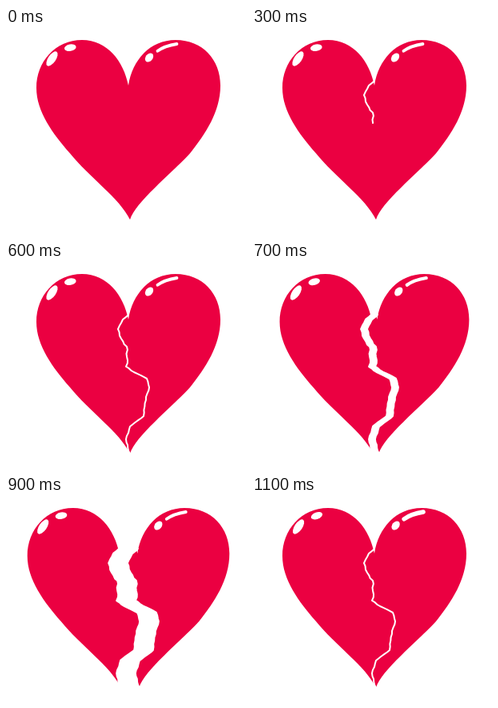
Recreate the animation shown at these times as an HTML page with a canvas. Size 300 by 258 pixels, loop 1200 ms.

```html
<!DOCTYPE html>
<html lang="en">
<head>
<meta charset="utf-8">
<title>Breaking heart</title>
<style>
  html, body { margin: 0; width: 100%; height: 100%; overflow: hidden; background: #fff; }
  canvas { display: block; width: 300px; height: 258px; }
</style>
</head>
<body>
<canvas id="stage" width="300" height="258"></canvas>
<script>
const ctx = document.getElementById('stage').getContext('2d');
const RED = '#eb0041';
const STEP = 100, STEPS = 12;
const CLOSED = 6;          // step at which the crack reaches the tip
const MAX_GAP = 11.3;

const heart = new Path2D(
  'M153 72 C147 42 127 15 95 15 C62 15 38 42 38 75 C38 105 59 133 80 157 ' +
  'C104 187 142 213 155 240 C162 218 205 184 230 157 ' +
  'C249 133 268 105 268 72 C268 40 246 15 212 15 C180 15 158 40 153 72Z');

const ease = t => t ** 1.73;
const noise = n => (Math.abs(Math.sin(n * 12.9898) * 43758.5453) % 1) * 2 - 1;

// Splits a polyline into short pieces and shakes the new points
function jag(keys, size) {
  const points = [keys[0]];
  for (let i = 1; i < keys.length; i++) {
    const [ax, ay] = keys[i - 1], [bx, by] = keys[i];
    const parts = Math.max(1, Math.round(Math.hypot(bx - ax, by - ay) / size));
    for (let k = 1; k <= parts; k++) {
      const t = k / parts, shake = k < parts ? noise(points.length) : 0;
      points.push([ax + (bx - ax) * t + shake, ay + (by - ay) * t - shake * 0.4]);
    }
  }
  return points;
}

const crack = jag([
  [153, 66], [146, 72], [140, 84], [144, 96], [151, 106], [152, 123], [150, 131],
  [160, 138], [176, 146], [179, 157], [175, 169], [172, 193], [155, 206], [150, 222], [155, 240]
], 4);

function trace(points) {
  ctx.beginPath();
  points.forEach(([x, y]) => ctx.lineTo(x, y));
}

function oval(x, y, a, b, deg) {
  ctx.beginPath();
  ctx.ellipse(x, y, a, b, deg * Math.PI / 180, 0, Math.PI * 2);
  ctx.fill();
}

// The shine wobbles through three poses: 0, 1, 2
function drawShine(pose) {
  const dx = Math.sin(pose * 1.2) * 0.9;
  ctx.fillStyle = '#fff';
  oval(57.5 + dx, 38.5, 10.5, 4.8, -56);
  oval(80.3 + dx, 24.7, 7.4, 4.2, -10 - pose * 5);
  oval(179 + dx, 37, 6.2, 4.4, -52);
  ctx.lineWidth = 3.8 + pose * pose * 0.4;
  ctx.beginPath();
  ctx.moveTo(189.5 + dx, 28.8);
  ctx.quadraticCurveTo(198 + dx, 22.5, 213.5 + dx, 20);
  ctx.stroke();
}

function drawHeart(pose) {
  ctx.fillStyle = RED;
  ctx.fill(heart);
  drawShine(pose);
}

function drawCrack(progress, width) {
  ctx.lineWidth = width;
  trace(crack.slice(0, Math.round(progress * crack.length)));
  ctx.stroke();
}

function drawHalf(side, gap, pose) {
  const edge = side < 0 ? -20 : 320;
  ctx.save();
  ctx.translate(side * gap, 0);
  ctx.save();
  trace([[edge, -10], [153, -10], ...crack, [155, 270], [edge, 270]]);
  ctx.clip();
  drawHeart(pose);
  ctx.restore();
  drawCrack(1, 3);
  ctx.restore();
}

function draw(step) {
  const pose = step % 3;
  const gap = MAX_GAP * ease(Math.max(0, 2.5 - Math.abs(step - 8.5)) / 2);
  ctx.fillStyle = ctx.strokeStyle = '#fff';
  ctx.fillRect(0, 0, 300, 258);
  ctx.lineCap = ctx.lineJoin = 'round';
  if (gap) {
    drawHalf(-1, gap, pose);
    drawHalf(1, gap, pose);
  } else {
    drawHeart(pose);
    drawCrack(ease(Math.min(1, step / CLOSED)), 2);
  }
}

const start = performance.now();
function tick() {
  const elapsed = performance.now() - start;
  draw(Math.floor(elapsed / STEP) % STEPS);
  requestAnimationFrame(tick);
}
tick();
</script>
</body>
</html>
```
